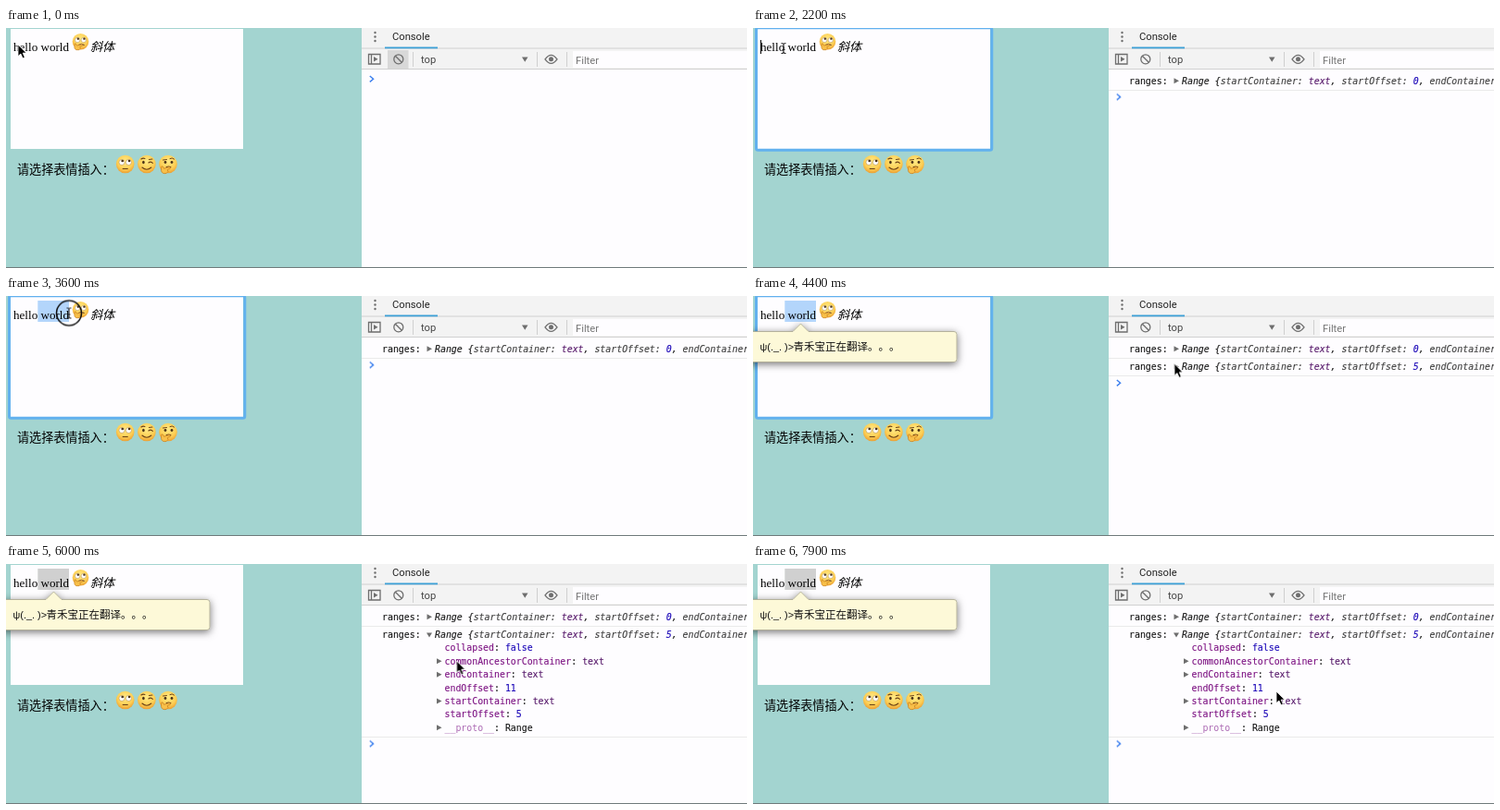
Recreate the animation shown at these times as an HTML page. Size 800 by 260 pixels, loop 8000 ms.

```html
<!DOCTYPE html>
<html lang="zh">
<head>
<meta charset="utf-8">
<title>Range demo</title>
<style>
html, body { margin: 0; width: 100%; height: 100%; overflow: hidden; }
svg { display: block; width: 800px; height: 260px; }
text { white-space: pre; text-spacing-trim: space-all; }
.page { font: 13.1px "Liberation Serif", "Noto Sans CJK SC", serif; }
.tip { font: 11.5px "Liberation Sans", "Noto Sans CJK SC", sans-serif; fill: #111; }
.tip .mood { font-size: 10.9px; }
.ui { font: 11.2px Roboto, sans-serif; fill: #444; }
.log { font: 9.9px "DejaVu Sans Mono", monospace; fill: #111; }
.log text { stroke: #222; stroke-width: .12; }
.i { font-style: italic; }
.dim { fill: #444; }
.key { fill: #7c1282; stroke: #7c1282; }
.proto { fill: #ac6ab4; stroke: none; }
.num { fill: #1c08b8; stroke: #1c08b8; }
.node { fill: #56186a; stroke: #56186a; }
.icon { fill: none; stroke: #6e6e6e; stroke-width: 1.3; }
.arrow { fill: #6e6e6e; }
.rule { fill: #eaeaea; }
.paper { fill: #fefdff; }

/* One loop is 8 s, so 1% is 80 ms. */
.step { animation: 8s step-end infinite; }
.hover { animation-name: hover; }
.focus { animation-name: focus; }
.caret { animation-name: caret; }
.log1 { animation-name: log1; }
.log2 { animation-name: log2; }
.tipbox { animation-name: tipbox; }
.closed { animation-name: closed; }
.open { animation-name: open; }
.prompt { animation-name: prompt; }
.blink { animation-name: blink; }
.press { animation-name: press; }
.beam { animation-name: beam; }
.pointer { animation-name: pointer; }
.select {
  transform-box: fill-box; transform-origin: left;
  animation: grow 8s linear infinite, tint 8s step-end infinite;
}
.mouse { animation: mouse 8s ease-in-out infinite; }

@keyframes hover { 0% { opacity: 1 } .6% { opacity: 0 } }
@keyframes focus { 0% { opacity: 0 } 14.4% { opacity: 1 } 65.6% { opacity: 0 } }
@keyframes caret { 0%, 20.6%, 33.1% { opacity: 0 } 14.4%, 26.9% { opacity: 1 } }
@keyframes log1 { 0% { opacity: 0 } 15.6% { opacity: 1 } }
@keyframes log2 { 0% { opacity: 0 } 45.6% { opacity: 1 } }
@keyframes tipbox { 0% { opacity: 0 } 48.1% { opacity: 1 } }
@keyframes closed { 0% { opacity: 1 } 65.6% { opacity: 0 } }
@keyframes open { 0% { opacity: 0 } 65.6% { opacity: 1 } }
@keyframes prompt {
  0% { transform: translateY(0) }
  15.6% { transform: translateY(19.5px) }
  45.6% { transform: translateY(39px) }
  65.6% { transform: translateY(139.5px) }
}
@keyframes blink {
  0%, 71.9%, 84.4%, 96.9% { opacity: 0 }
  65.6%, 78.1%, 90.6% { opacity: 1 }
}
@keyframes press {
  0%, 15.6%, 45.6%, 65.6% { opacity: 0 }
  14.4%, 35%, 63.1% { opacity: 1 }
}
@keyframes beam { 0%, 48.1% { opacity: 0 } .6% { opacity: 1 } }
@keyframes pointer { 0%, 48.1% { opacity: 1 } .6% { opacity: 0 } }
@keyframes grow {
  0% { transform: scaleX(0) }
  35% { transform: scaleX(0); animation-timing-function: steps(6) }
  42.5%, 100% { transform: scaleX(1) }
}
@keyframes tint { 0% { fill: #b3d5fb } 65.6% { fill: #d0d0d0 } }
@keyframes mouse {
  0%, 6% { transform: translate(13px, 18px) }
  13%, 17% { transform: translate(10px, 20px) }
  25%, 29% { transform: translate(33px, 22px) }
  34%, 35% { transform: translate(35px, 20px) }
  42.5%, 46.5% { transform: translate(68px, 18.5px) }
  53.8%, 55.5% { transform: translate(455px, 73.5px) }
  59%, 70% { transform: translate(456.5px, 76px) }
  82.5%, 85% { transform: translate(546.5px, 163px) }
  94%, 100% { transform: translate(565px, 138px) }
}
</style>
</head>
<body>
<svg viewBox="0 0 800 260">
  <defs>
    <radialGradient id="skin" cx=".5" cy=".35" r=".65">
      <stop offset="0" stop-color="#ffea85"/>
      <stop offset=".65" stop-color="#fdcf55"/>
      <stop offset="1" stop-color="#eb9f33"/>
    </radialGradient>
    <filter id="shadow" x="-10%" y="-50%" width="120%" height="220%">
      <feDropShadow dx="0" dy="2" stdDeviation="4.5" flood-opacity=".55"/>
    </filter>
    <circle id="face" r="9.8" fill="url(#skin)"/>
    <g id="eyes">
      <g fill="#fff" stroke="#a87c34" stroke-width=".5">
        <circle cx="-3.7" cy="-2" r="3"/><circle cx="3.7" cy="-2" r="3"/>
      </g>
      <g fill="#4a3218"><circle cx="-3" cy="-3.5" r="1.3"/><circle cx="4.4" cy="-3.5" r="1.3"/></g>
    </g>
    <path id="hand" d="M-7 2.5q1.3-1 2 1l.5 1.3 6-1.6q1.7 0 1 1.5l-3.3 1.4q2 2-1 3.8-4.5 1-5.5-2.2z"
      fill="#f8c04a" stroke="#c47a1c" stroke-width=".7"/>
    <path id="right" class="arrow" d="M0-3l5.5 3-5.5 3z"/>
  </defs>

  <!-- page -->
  <rect width="384" height="260" fill="#a3d4d0"/>
  <rect class="paper" x="5" y="1" width="251" height="130"/>
  <rect class="step focus" x="3.5" y="-.3" width="254.3" height="132.6" rx="2" fill="none" stroke="#62b1ee" stroke-width="3"/>
  <rect class="select" x="34.3" y="5" width="33.7" height="23"/>
  <g class="page">
    <text x="8" y="24.5">hello world</text>
    <text class="i" x="91" y="25">斜体</text>
    <text x="12" y="158">请选择表情插入：</text>
  </g>
  <rect class="step caret" x="8" y="13" width="1" height="15"/>

  <g transform="translate(80.5 14.8) scale(.9)">
    <use href="#face"/><use href="#eyes"/>
    <path d="M-2.5 4q3.5-2.5 7 0z" fill="#fff" stroke="#6b4218" stroke-width=".9"/>
    <use href="#hand"/>
  </g>
  <g transform="translate(128.7 147.5)">
    <use href="#face"/><use href="#eyes"/>
    <path d="M-3 5h6" stroke="#6b4218" stroke-width="1.1"/>
  </g>
  <g transform="translate(151.9 147.5)" fill="none" stroke="#6b4218" stroke-width="1.1" stroke-linecap="round">
    <use href="#face" stroke="none"/>
    <ellipse cx="-3.5" cy="-2" rx="1.3" ry="1.8" fill="#4a3218" stroke="none"/>
    <path d="M-6-5.5q2-1.5 4-.5M2-1.5q2-1.8 4.5.3M2.5-5l3.5-.5M-5 3.5q5 4.5 10 0"/>
  </g>
  <g transform="translate(175 147.5)" fill="none" stroke="#6b4218" stroke-linecap="round">
    <use href="#face" stroke="none"/>
    <g fill="#4a3218" stroke="none"><circle cx="-3" cy="-2" r="1.4"/><circle cx="4" cy="-2" r="1.4"/></g>
    <path d="M-5.5-4.5l4-.5M2-6q2.5-1.5 4.5.5M-2 3q2.5-1.2 5 0"/>
    <use href="#hand"/>
  </g>

  <!-- console -->
  <rect class="paper" x="384" width="416" height="260"/>
  <rect x="384" width="416" height="44.5" fill="#f3f3f3"/>
  <path d="M384 22H800M384 44.5H800M439.5 26V42M573.5 26V42M605.5 26V42" stroke="#d0d0d0"/>
  <rect x="409" y="20.5" width="57" height="1.8" fill="#3c9fd6"/>
  <g fill="#6e6e6e"><circle cx="398.5" cy="5" r="1.2"/><circle cx="398.5" cy="9.5" r="1.2"/><circle cx="398.5" cy="14" r="1.2"/></g>
  <rect class="step hover" x="412" y="24" width="22.5" height="20" fill="#d8d8d8"/>
  <rect class="paper" x="612" y="25" width="188" height="18"/>
  <g class="icon">
    <path d="M391.5 28.5h12.5v10.5h-12.5zM394.5 28.5v10.5"/>
    <circle cx="423.8" cy="33.8" r="5"/><path d="M420.3 30.3l7 7"/>
    <path d="M582 33.8q6.5-9 13 0q-6.5 9-13 0z"/>
  </g>
  <circle cx="588.5" cy="33.8" r="2.5" fill="#6e6e6e"/>
  <path d="M397 31l4.5 2.8-4.5 2.8zM557 31.5h6.5l-3.25 5.2z" fill="#6e6e6e"/>
  <g class="ui">
    <text x="417" y="13" style="fill:#222">Console</text>
    <text x="448" y="37.8">top</text>
    <text x="615" y="38.5" style="fill:#777">Filter</text>
  </g>

  <g class="log">
    <g class="step log1">
      <text x="406" y="61">ranges:</text>
      <use href="#right" x="454.5" y="57.3"/>
      <text class="i" x="463" y="61">Range {<tspan class="dim">startContainer: </tspan><tspan class="node">text</tspan>, <tspan class="dim">startOffset: </tspan><tspan class="num">0</tspan>, <tspan class="dim">endContainer</tspan></text>
      <rect class="rule" x="384" y="67" width="416" height="1"/>
    </g>
    <g class="step log2">
      <text x="406" y="80">ranges:</text>
      <text class="i" x="463" y="80">Range {<tspan class="dim">startContainer: </tspan><tspan class="node">text</tspan>, <tspan class="dim">startOffset: </tspan><tspan class="num">5</tspan>, <tspan class="dim">endContainer</tspan></text>
      <g class="step closed">
        <use href="#right" x="454.5" y="76.5"/>
        <rect class="rule" x="384" y="86" width="416" height="1"/>
      </g>
    </g>
    <g class="step open">
      <path class="arrow" d="M454 74.5h6l-3 5z"/>
      <text x="473.5" y="94.3"><tspan class="key">collapsed</tspan>: <tspan class="num">false</tspan></text>
      <text x="473.5" y="108.7"><tspan class="key">commonAncestorContainer</tspan>: <tspan class="node">text</tspan></text>
      <text x="473.5" y="123.1"><tspan class="key">endContainer</tspan>: <tspan class="node">text</tspan></text>
      <text x="473.5" y="137.5"><tspan class="key">endOffset</tspan>: <tspan class="num">11</tspan></text>
      <text x="473.5" y="151.9"><tspan class="key">startContainer</tspan>: <tspan class="node">text</tspan></text>
      <text x="473.5" y="166.3"><tspan class="key">startOffset</tspan>: <tspan class="num">5</tspan></text>
      <text x="473.5" y="180.7"><tspan class="proto">__proto__</tspan>: Range</text>
      <use href="#right" x="465" y="105.3"/>
      <use href="#right" x="465" y="119.7"/>
      <use href="#right" x="465" y="148.5"/>
      <use href="#right" x="465" y="177.3"/>
      <rect class="rule" x="384" y="187" width="416" height="1"/>
    </g>
  </g>
  <path class="step prompt" d="M392.8 52l3.8 3.2-3.8 3.2" fill="none" stroke="#3c7fee" stroke-width="1.4"/>
  <rect class="step blink" x="406" y="188.5" width="1.2" height="12" fill="#222"/>

  <!-- translation bubble -->
  <g class="step tipbox">
    <path d="M-6 38.5H43l8.5-8.500 8.5 8.500H217q3 0 3 3V68.500q0 3-3 3H-6z" fill="#fdf9d8" stroke="#a5a38c" stroke-width=".8" filter="url(#shadow)"/>
    <g class="tip">
      <text class="mood" x="7.5" y="59">ψ(._. )&gt;</text>
      <text x="43.5" y="59">青禾宝正在翻译。。。</text>
    </g>
  </g>

  <rect y="259" width="800" height="1" fill="#6f7a7a"/>

  <g class="mouse">
    <circle class="step press" r="13.5" fill="none" stroke="#111" stroke-width="1.5"/>
    <path class="step beam" d="M-2.5-5.5q2.5 0 2.5 1.5V4q0 1.5-2.5 1.5M2.5-5.5Q0-5.5 0-4V4q0 1.5 2.5 1.5M-1.5 1.5h3" fill="none" stroke="#222" stroke-width="1.1"/>
    <path class="step pointer" d="M0 0V12.6l2.9-2.6 2.2 4.8 2.2-1-2.1-4.700h3.800z" stroke="#fff" stroke-width=".8"/>
  </g>
</svg>
</body>
</html>
```
